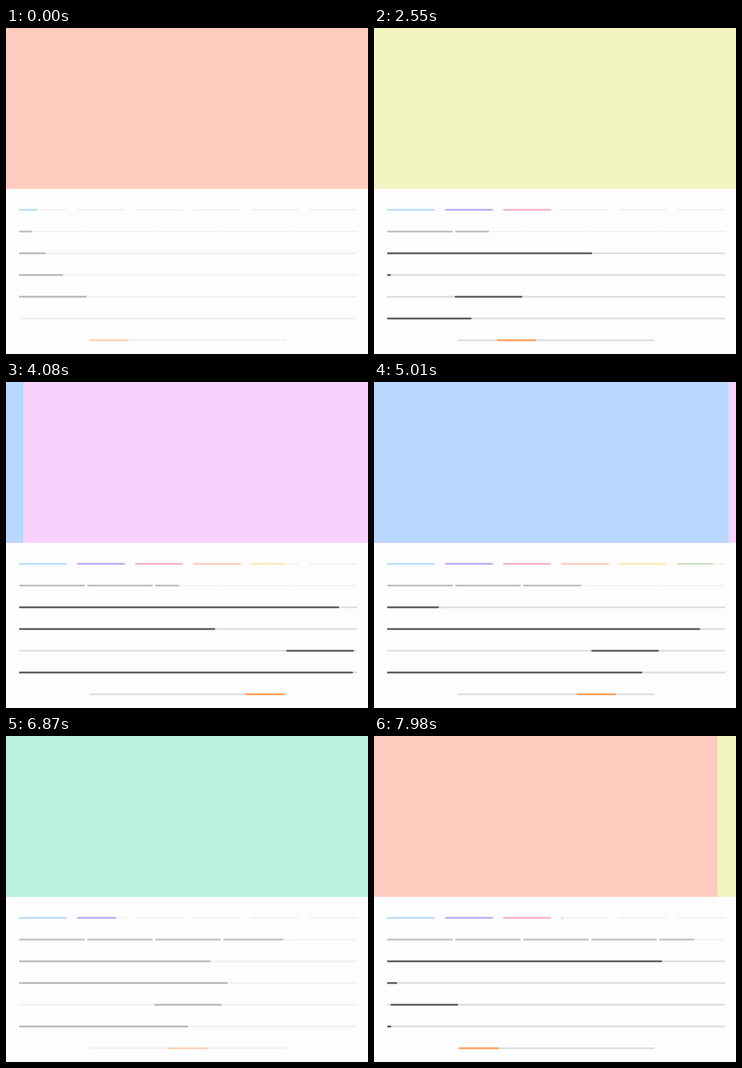
An HTML page with a canvas for the animation above (8 s loop, 500x450 px).

```html
<!DOCTYPE html>
<html lang="en">
<head>
<meta charset="utf-8">
<title>Carousel progress bars</title>
<style>
  html, body { margin: 0; width: 100%; height: 100%; overflow: hidden; background: #fdfdfd; }
  canvas { display: block; }
</style>
</head>
<body>
<canvas width="500" height="450"></canvas>
<script>
const ctx = document.querySelector('canvas').getContext('2d');
const LOOP = 8000, MOVE = 430, LEFT = 18, WIDTH = 467;
const SLIDES = ['#ffccbe', '#f2f5c0', '#b9f2dc', '#b9d8ff', '#f8d2fe'];
const STEPS = ['#b9dcf7', '#b6aef3', '#f7b0c4', '#fdcdb9', '#faeab2', '#d0dfc0'];
const PALE = '#f3f3f3', GREY = '#bfbfbf', TRACK = '#dedede', DARK = '#5a5a5a', ORANGE = '#ff9f57';

// [start time, direction] of every slide change
const MOVES = [[1749, 1], [2670, 1], [3281, 1], [3712, 1], [4620, -1], [5330, -1], [6980, -1], [7613, -1]];

const clamp = v => Math.min(1, Math.max(0, v));
const ease = v => (1 - Math.cos(Math.PI * clamp(v))) / 2;
const slideAt = t => MOVES.reduce((pos, [start, dir]) => pos + dir * ease((t - start) / MOVE), 0);

// Bars fade in when sliding starts and fade out when idle
const visibility = t =>
  0.38 + 0.62 * (clamp((t - 1749) / 250) - clamp((t - 6250) / 300) + clamp((t - 6980) / 250));

function bar(x, y, w, color, h = 2.7) {
  if (w <= 0) return;
  ctx.fillStyle = color;
  ctx.beginPath();
  ctx.roundRect(x, y - h / 2, w, h, Math.min(w, h) / 2);
  ctx.fill();
}

function segments(y, count, pitch, width, progress, color) {
  for (let i = 0; i < count; i++) {
    const x = LEFT + i * pitch;
    bar(x, y, width, PALE, 2);
    bar(x, y, width * clamp(progress - i), color(i));
  }
}

function row(y, from, size, color = DARK, x = LEFT, width = WIDTH) {
  bar(x, y, width, TRACK, 2.4);
  bar(x + from * width, y, size * width, color);
}

function draw(t) {
  const pos = slideAt(t);
  ctx.fillStyle = '#fdfdfd';
  ctx.fillRect(0, 0, 500, 450);
  SLIDES.forEach((color, i) => {
    ctx.fillStyle = color;
    ctx.fillRect((i - pos) * 500, 0, 500, 222);
  });

  segments(251, 6, 80.1, 66.2, (t + 165) / 900 % 6, i => STEPS[i]);
  segments(281, 5, 94, 90.8, (t + 180) / 1800 % 5, () => GREY);

  ctx.globalAlpha = visibility(t);
  row(311, 0, (t + 180) / 4500 % 1);
  row(341, 0, (t + 170) / 2690 % 1);
  row(371, pos / 5, 0.2);
  row(401, 0, pos / 4);
  row(431, pos / 5, 0.2, ORANGE, 115, 272.5);
  ctx.globalAlpha = 1;
}

const origin = performance.now();
function tick() {
  const t = (performance.now() - origin) % LOOP;
  draw(t < 210 ? 180 : t); // the opening pose is held briefly
  requestAnimationFrame(tick);
}
tick();
</script>
</body>
</html>
```
